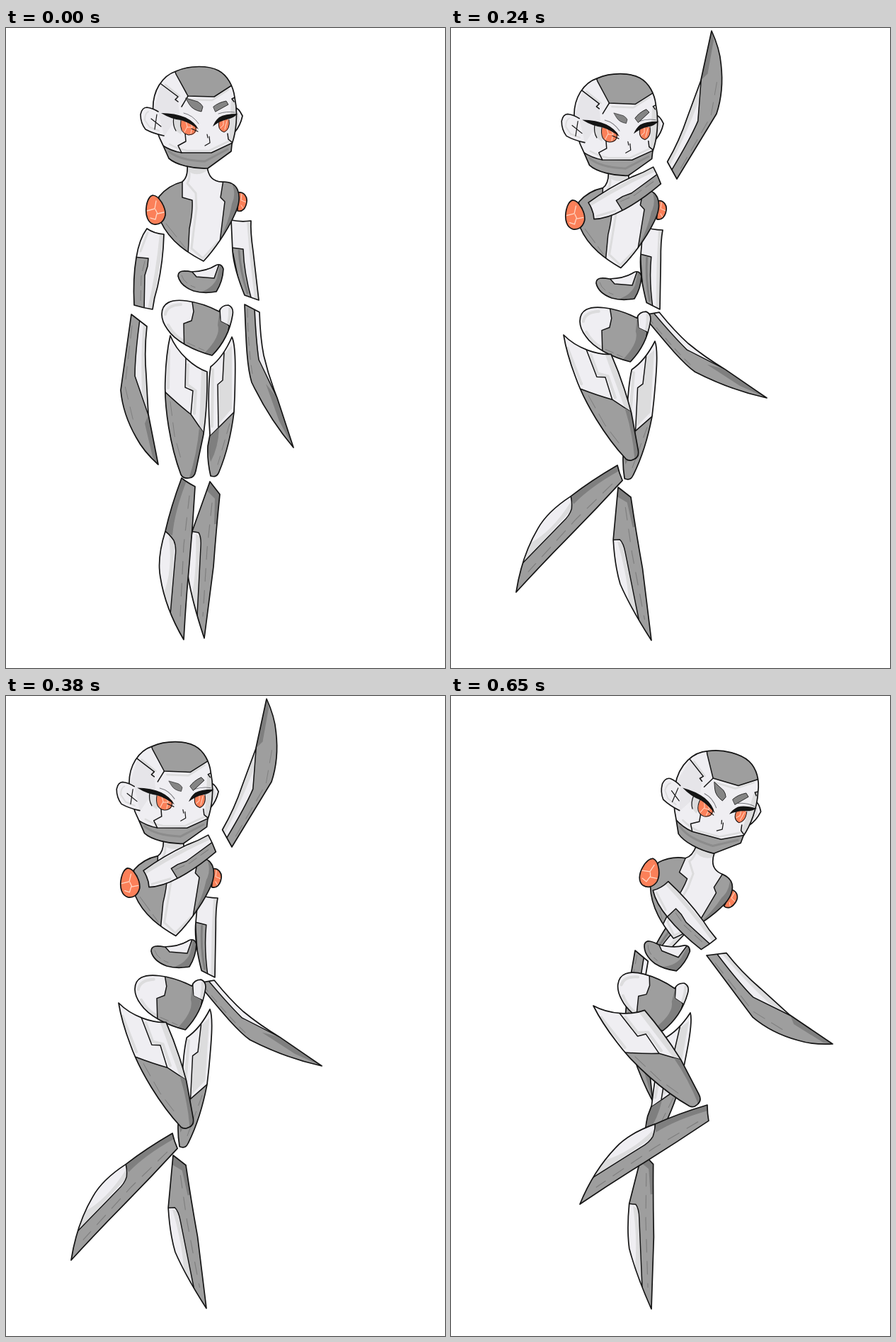
An HTML page that plays this animation: 620 by 903 pixels, repeating every 760 ms.

```html
<!DOCTYPE html>
<html lang="en">
<head>
<meta charset="utf-8">
<title>Robot poses</title>
<style>
html, body { margin: 0; width: 100%; height: 100%; overflow: hidden; background: #fff; }
svg { display: block; width: 100vw; height: 100vh; }
</style>
</head>
<body>
<svg id="stage" viewBox="0 0 620 903"></svg>
<script>
const INK = '#141414', LIGHT = '#efeef2', PALE = '#dcdcdd', GREY = '#9e9e9e', SHADE = '#7f7f7f';
const ORANGE = '#fb8059', GLOW = '#ffd6c4';
const STEPS = [240, 480, 760], LOOP = 760;

const area = (fill, d) => `<path d="${d}" fill="${fill}"/>`;
const line = (d, stroke = INK, width = 1.5, dash = '') =>
  `<path d="${d}" fill="none" stroke="${stroke}" stroke-width="${width}" stroke-dasharray="${dash}"/>`;
const panel = d => area(GREY, d) + line(d);

// Two anchor points per pose: x1, y1, x2, y2
const poses = {
  head: [[258,139,308,137], [224,149,274,147.5], [360,158,409,169]],
  browL: [[255,99,278,116], [231,120,249,133], [373,122,386,147]],
  browR: [[293,115,314,104], [261,131,279,115], [398,150,420,138]],
  torso: [[211,257,335,245], [175,264,299,257], [281,250,398,288]],
  belly: [[243,347,306,338], [205,357,268,348], [274,348,337,358]],
  hips: [[220,402,320,398], [182,412,281.5,407], [236,405,335,413]],
  armL: [[211,287,194,394], [198,258,291,208], [296,268,364,350]],
  foreL: [[177,404,215,616], [319,213,368,4], [361,366,539,491]],
  armR: [[346,272,357,384], [299,285,295,397], [376,291,297,370]],
  foreR: [[337,390,406,592], [271,405,446,522], [260,359,285,572]],
  thighL: [[232,434,256,635], [159,433,257,609], [201,437,347,577]],
  thighR: [[319,436,293,633], [288,442,249,637], [338,447,278,637]],
  shinL: [[248,635,251,863], [235,617,92,796], [362,577,182,717]],
  shinR: [[288,640,280,861], [236,648,283,864], [270,644,283,865]]
};

// Back to front: pose, fill, outline, details inside the outline, details on top
const parts = [
  ['foreR', GREY, 'M337 390L358 401Q359 437 364 462Q371 492 383 522L406 592Q372 552 347 500C340 478 339 440 337 390Z',
    area(LIGHT, 'M352 397L360 400L364 462L384 524L358 472Q354 440 352 397Z') +
    line('M351 397Q353 440 357 468L384 524') + line('M341 396Q342 450 348 488', SHADE, 1, '12 8') +
    area(SHADE, 'M383 522L406 592L386 555L367 502Z')],
  ['armR', LIGHT, 'M318 271Q332 274 346 272Q345 287 349 315L357 384L337 377Q322 340 320 315Z',
    area(PALE, 'M340 273L347 272L358 384L351 382L344 320Z') +
    panel('M319 310L335 312Q336 345 347 384L334 384Z') + line('M329 314Q331 344 341 374', SHADE, 3)],
  ['torso', ORANGE, 'M328 232C336 231 341 238 340 245C339 254 334 260 327 258Z',
    line('M333 233L332 243L340 246M332 250L336 256', GLOW, 1)],
  ['torso', LIGHT, 'M256 194C257 207 254 213 249 217Q229 222 216 238Q213 256 219 274C232 302 258 318 279 329C293 314 312 288 323 263Q333 242 327 228Q322 217 307 217Q286 218 284 194Z',
    line('M258 198Q261 211 256 219L268 233L269 254L262 311L278 325L299 302', PALE, 3) +
    area(PALE, 'M256 194L284 194L284 201Q270 211 257 202Z') +
    panel('M249 215V239L263 243Q264 259 259 283L257 320L200 300V230Z') +
    line('M221 246Q218 260 226 276L253 310', SHADE, 1, '24 7') +
    panel('M307 214L303 239L309 245L302 302L345 270V210Z') +
    area(SHADE, 'M318 216Q326 234 319 248Q315 272 303 297L335 263V220Z')],
  ['head', LIGHT, 'M321 113Q327 110 334 124Q331 138 323 147Z', line('M327 120L329 129L325 138', PALE, 2)],
  ['head', LIGHT, 'M208 120C205 88 222 67 240 61C260 52 287 53 300 60C313 67 321 82 323 98C328 121 325 147 319 164L318 174L285 198C264 199 240 193 230 184L222 166Q210 143 208 120Z',
    area('#e6e5e9', 'M207 120L219 80L242 97L245 120L222 155Z') +
    area(PALE, 'M318 100L330 98L322 165L315 160Z') +
    line('M225 80L245 96M261 101L291 102L314 87M231 164Q243 171 256 173H287L314 160', PALE, 2.5) +
    panel('M237 56L240 65L257 96L294 97L325 77L303 45Z') +
    panel('M220 165Q234 174 248 176H290L322 161V175L286 202L230 190Z') +
    line('M230 174Q245 187 281 188L313 171', '#8c8c8c', 3) +
    line('M219 79L243 97L239 101L243 104M257 96L248 111M253 148L254 160L243 166L248 176M313 149L314 157L319 161M325 97L319 100L322 104'),
    area(PALE, 'M237 127Q246 126 254 131L247 150Q238 145 236 137Z') +
    area(ORANGE, 'M247 131Q256 126 269 138Q271 149 261 151Q249 151 247 140Z') +
    line('M247 130Q244 149 258 151Q270 150 268 139', INK, 1) +
    line('M254 132L256 139L252 147M260 135L263 139L261 149M256 140H262', GLOW, 1) +
    area(ORANGE, 'M301 130Q308 126 315 130Q317 144 308 147Q300 145 300 136Z') +
    line('M301 131Q298 144 308 147Q317 143 315 129', INK, 1) +
    line('M307 130V137L303 141M312 131L309 143', GLOW, 1) +
    area(INK, 'M219 120Q239 120 253 126Q266 132 272 143Q258 133 247 130Q234 129 219 120Z') +
    area(INK, 'M327 121Q309 121 301 126Q295 131 292 139Q302 131 312 129Q322 127 327 121Z') +
    line('M237 126Q235 137 240 145M262 142L271 146M284 150L285 155M287 153L288 162L281 166', INK, 1.2) +
    line('M251 120Q264 123 272 135M300 121Q312 117 323 119', '#77777c', 1)],
  ['head', 'none', '', '',
    `<path d="M215 118Q207 113 199 112Q192 112 190 122Q190 134 197 143Q208 149 223 152" fill="${LIGHT}" stroke="${INK}" stroke-width="1.6"/>` +
    line('M201 118Q196 120 196 130L203 140L216 145', PALE, 2) +
    line('M205 128L219 139M213 122L210 143', INK, 1.2)],
  ['browL', '#858585', 'M254 99L271 104Q276 107 278 111L276 118Q264 116 259 108Z'],
  ['browR', '#858585', 'M293 111Q300 105 311 103L314 108L296 118Z'],
  ['belly', GREY, 'M243 350C243 342 251 342 262 344Q284 343 296 335Q304 331 307 340Q306 358 297 372Q279 375 265 371Q246 364 243 350Z',
    area(SHADE, 'M302 334L310 332L300 376L270 374Q291 369 298 353Z') +
    area(LIGHT, 'M261 342L269 351L294 353L301 331L280 330Z') + line('M261 342L269 351L294 353L301 333') +
    line('M248 349Q251 360 267 366', SHADE, 1, '14 6')],
  ['hips', LIGHT, 'M220 404C220 388 233 382 255 385Q278 388 301 400Q304 391 314 391Q322 394 320 405C316 430 305 448 291 462C265 455 239 442 228 425Q220 414 220 404Z',
    line('M225 404Q227 391 247 390M229 419Q237 434 250 441M316 396Q317 410 311 429', PALE, 4) +
    panel('M262 380L265 400L262 413L251 417L252 470H306L315 420L303 414L302 396Z') +
    area(SHADE, 'M301 402L303 414L313 419L312 440L291 462L280 459Q304 435 299 419Z') +
    line('M256 444L280 455', SHADE, 1, '12 6')],
  ['shinR', GREY, 'M288 640L302 658Q297 706 293 760L280 861Q263 810 257 773Q256 746 263 710Z',
    area(SHADE, 'M288 640L303 658L298 700L294 700L295 664L283 652Z') +
    area(LIGHT, 'M261 710L272 712Q276 718 275 732L270 826L245 800Z') +
    area(PALE, 'M268 714L274 718L270 826L262 803Q270 765 268 714Z') +
    line('M261 710L272 712Q276 718 275 732L270 829') +
    line('M291 670L284 735L278 830', SHADE, 1.2, '18 13')],
  ['thighR', LIGHT, 'M319 436C325 448 324 485 323 520L322 542Q316 590 301 626Q298 635 289 632Q284 610 285 590L288 574Q284 510 289 478Q307 464 319 436Z',
    area(PALE, 'M308 460L319 448V537L301 558L300 503L306 497Z') +
    line('M292 482L291 562', PALE, 4) +
    line('M308 458L306 497L299 503L300 563') +
    panel('M284 580L301 563L327 537L312 642H280Z') +
    area(SHADE, 'M286 578L301 564Q300 592 289 612L285 595Z') +
    line('M316 558L299 616', SHADE, 1, '15 9')],
  ['shinL', GREY, 'M248 635Q257 642 267 647Q264 700 259 755Q254 808 251 863Q225 819 218 775Q213 748 225 710Q233 675 248 635Z',
    area(SHADE, 'M247 634L255 639Q238 682 235 716L223 711Z') +
    area(LIGHT, 'M220 709Q230 713 237 723Q241 732 239 746L232 826L208 790Z') +
    area(PALE, 'M230 717L238 725L232 825L222 799Q236 766 230 717Z') +
    line('M222 708Q230 713 237 723Q241 732 239 746L232 828') +
    line('M259 660L251 730L246 830', SHADE, 1.2, '18 13')],
  ['thighL', LIGHT, 'M232 434C242 459 266 479 284 485Q285 528 279 573L268 625Q266 635 258 635Q250 636 247 630C232 590 223 535 225 495Q226 460 232 434Z',
    line('M230 454L229 508M257 475L256 503L268 512L266 544', PALE, 4) +
    area(PALE, 'M276 482L285 485L280 573L273 560Z') +
    line('M254 465L253 507L264 512L261 546') +
    panel('M222 511Q243 531 261 545L283 577L275 645H240Z') +
    area(SHADE, 'M273 563L282 575L267 637H258Q270 600 273 563Z') +
    line('M232 527L238 575L249 615', SHADE, 1, '20 10')],
  ['foreL', GREY, 'M177 404L199 421Q195 455 198 490L201 545L215 616Q194 597 184 578Q165 545 162 511Z',
    area(LIGHT, 'M189 410L201 418V546L183 492Q182 470 189 410Z') +
    area(PALE, 'M194 414L202 418V546L192 514Q190 460 194 414Z') +
    line('M189 411Q182 463 182 491L201 546') +
    area(SHADE, 'M201 546L215 616L207 605L196 558Z') +
    line('M178 420L168 505L180 555', SHADE, 1, '18 11')],
  ['armL', LIGHT, 'M199 283Q209 290 223 291Q222 329 214 365Q209 381 207 397Q194 395 181 391Q179 353 184 324Q188 298 199 283Z',
    area(PALE, 'M217 290L224 291L207 398L200 396Q212 345 217 290Z') +
    line('M200 289L190 315', PALE, 3) +
    panel('M180 323L201 325L200 336L196 349L195 400L175 394Z') +
    line('M196 329L191 350L190 386', SHADE, 1, '14 7')],
  ['torso', ORANGE, 'M207 236C216 236 226 253 225 264C223 274 216 278 209 277C200 275 197 264 198 254C199 243 203 237 207 236Z',
    line('M199 258L210 255L212 244M211 256L214 262L223 260M213 262L211 270L204 268', GLOW, 1.3)]
];

const stage = document.getElementById('stage');
stage.innerHTML = parts.map(([pose, fill, outline, inner = '', over = ''], i) => `
  <g data-pose="${pose}" stroke-linejoin="round" stroke-linecap="round">
    <clipPath id="clip${i}"><path d="${outline}"/></clipPath>
    ${area(fill, outline)}<g clip-path="url(#clip${i})">${inner}</g>
    ${line(outline, INK, pose.startsWith('brow') ? 0.8 : 1.7)}${over}
  </g>`).join('');
const groups = [...stage.querySelectorAll('[data-pose]')];

// Rotation, scale and shift that carry one anchor pair onto another
function carry([x1, y1, x2, y2], [u1, v1, u2, v2]) {
  const dx = x2 - x1, dy = y2 - y1, du = u2 - u1, dv = v2 - v1, n = dx * dx + dy * dy;
  const a = (dx * du + dy * dv) / n, b = (dx * dv - dy * du) / n;
  return `matrix(${[a, b, -b, a, u1 - a * x1 + b * y1, v1 - b * x1 - a * y1]})`;
}

function draw(time) {
  const step = STEPS.findIndex(end => time % LOOP < end);
  for (const group of groups) {
    const pose = poses[group.dataset.pose];
    group.setAttribute('transform', carry(pose[0], pose[step]));
  }
}

function tick() {
  draw(performance.now());
  requestAnimationFrame(tick);
}
tick();
</script>
</body>
</html>
```
